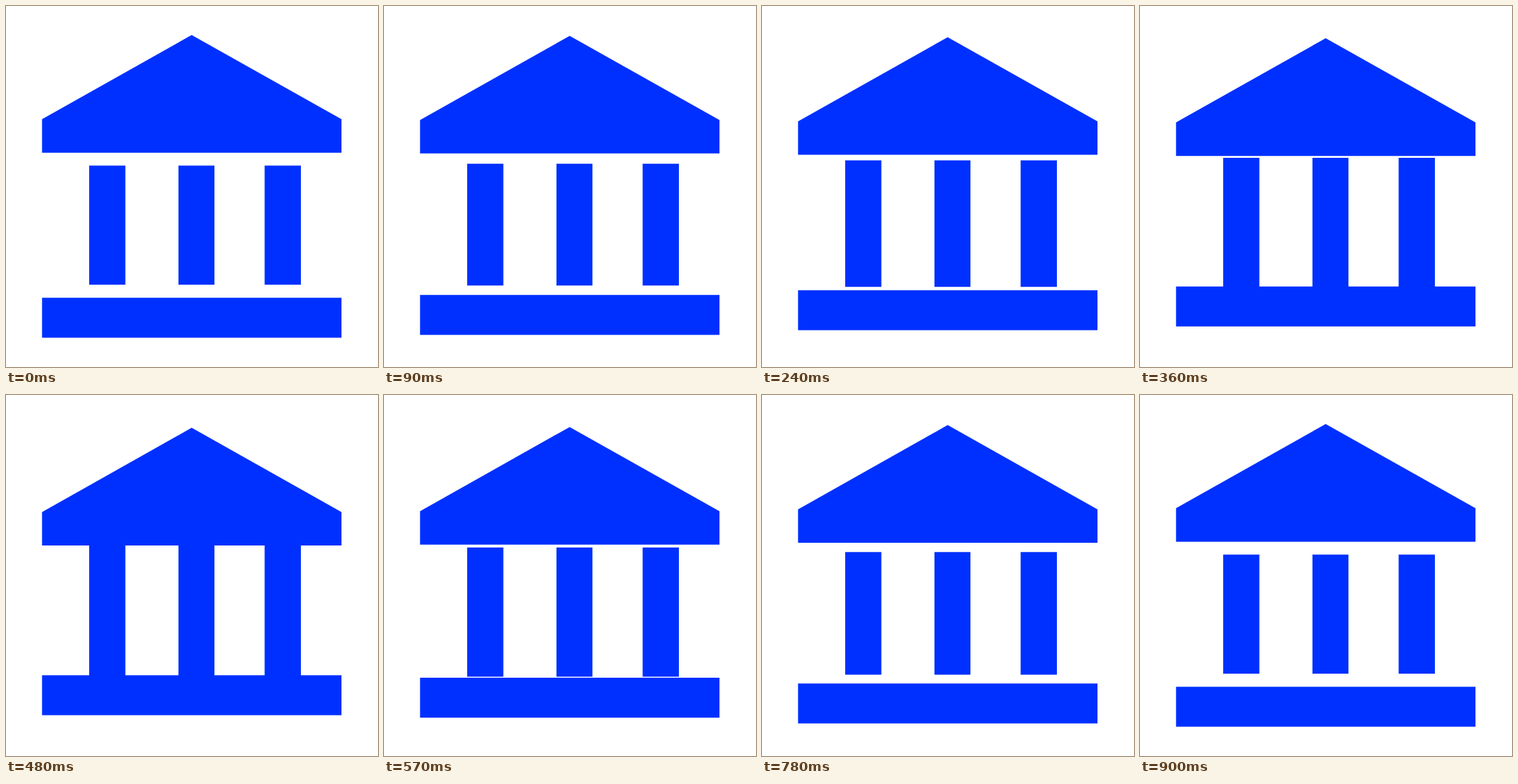
Write an HTML page that moves like this. It is 550x535 px and loops after 0.93 s.

```html
<!DOCTYPE html>
<html lang="en">
<head>
<meta charset="utf-8">
<title>Columned building</title>
<style>
  html, body { margin: 0; width: 100%; height: 100%; overflow: hidden; background: #fff; }
  svg { display: block; width: 100%; height: 100%; }
</style>
</head>
<body>
<svg viewBox="0 0 550 535" fill="#0030ff">
  <path id="roof" d="M274.5 43 L496 167.8 V217.4 H53.3 V167.8 Z"/>
  <path id="columns"/>
  <rect id="base" x="53.3" y="432.4" width="442.7" height="59.2"/>
</svg>
<script>
  const LOOP = 930, STEP = 30, END = 900;
  const [roof, columns, base] = ['roof', 'columns', 'base'].map(id => document.getElementById(id));
  const spans = [[123, 176.5], [255, 308.2], [382.4, 436]];

  // Linear rise to 1 at the peak time, then linear return to 0.
  const swing = (t, peak) => t < peak ? t / peak : (END - t) / (END - peak);

  const shift = (el, y) => el.setAttribute('transform', `translate(0 ${y})`);

  function draw(ms) {
    const t = Math.floor((ms % LOOP) / STEP) * STEP;
    const press = swing(t, 450);
    const top = 236.6 - 14.5 * press;
    const bottom = 413 + 6 * press;
    shift(roof, 6 * press);
    shift(base, -19.5 * swing(t, 420));
    columns.setAttribute('d', spans.map(([l, r]) => `M${l} ${top}H${r}V${bottom}H${l}Z`).join(''));
  }

  const start = performance.now();
  function tick() {
    draw(performance.now() - start);
    requestAnimationFrame(tick);
  }
  tick();
</script>
</body>
</html>
```
